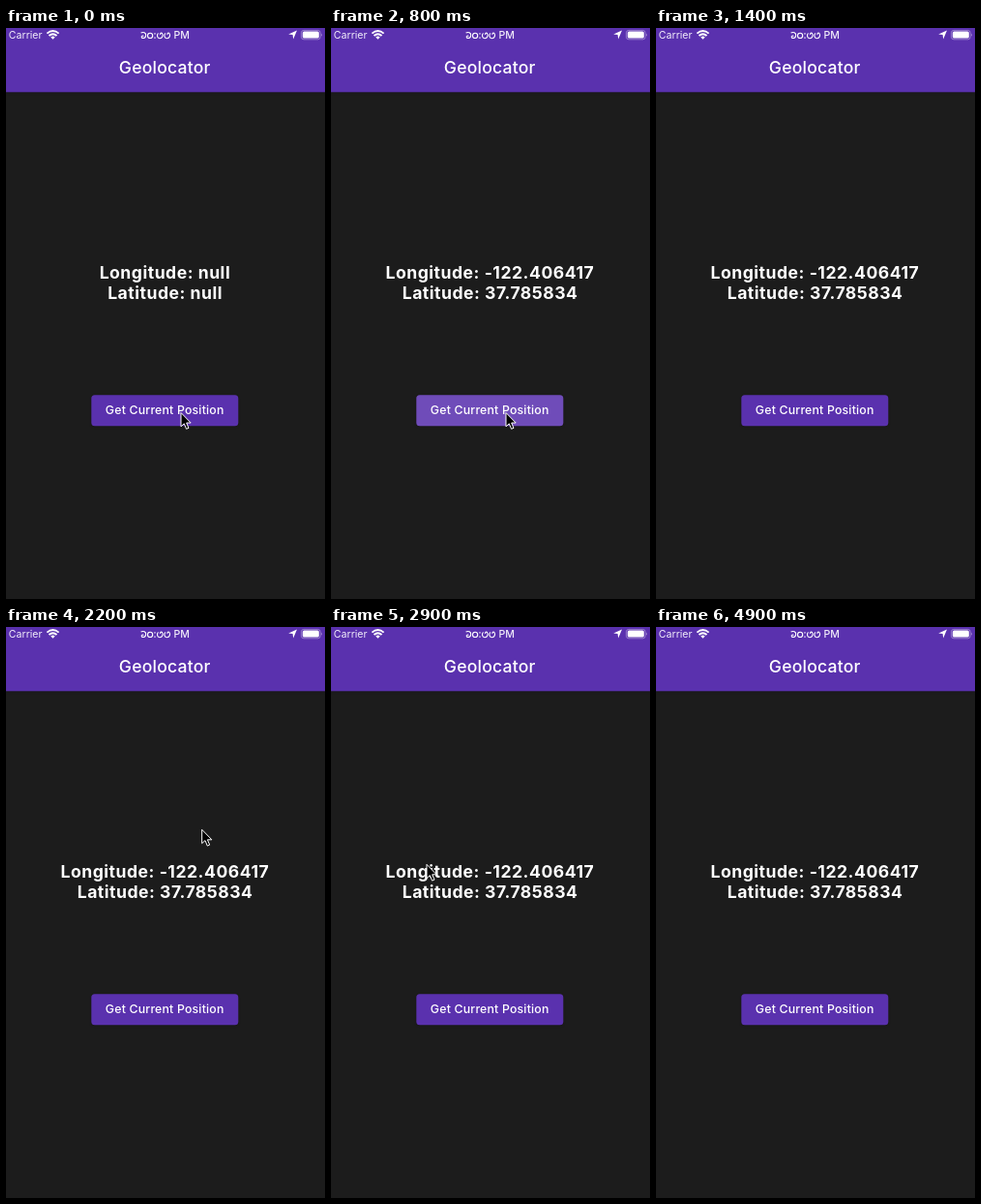
These frames come from a looping animation (330x590 px, 5800 ms). An HTML page:

```html
<!DOCTYPE html>
<html lang="en">
<head>
<meta charset="utf-8">
<title>Geolocator</title>
<style>
  html, body { margin: 0; width: 100%; height: 100%; overflow: hidden; background: #1c1c1c; }
  svg { display: block; width: 330px; height: 590px; }
  text { font-family: Inter, Roboto, sans-serif; fill: #fff; }
  .mid { text-anchor: middle; }
  .status { font-size: 10.6px; fill: #f1ecfa; }
  .title { font-size: 17.6px; font-weight: 500; letter-spacing: .2px; }
  .coords { font-size: 17.6px; font-weight: 700; letter-spacing: .5px; }
  .label { font-size: 12.3px; font-weight: 500; letter-spacing: .19px; }
  .line { fill: none; stroke: #fff; }
  .shadow { filter: drop-shadow(0 1px 1px rgba(0, 0, 0, .2)); }
</style>
</head>
<body>
<svg viewBox="0 0 330 590">
  <defs>
    <rect id="button" x="88.3" y="379.2" width="152" height="32" rx="3.5"/>
    <clipPath id="buttonClip"><use href="#button"/></clipPath>
    <path id="three" d="M1.5 1.6C-.2 3.2 .2 6.9 3 6.9C6 6.9 6.9 3.3 5.5 1.7C4.6 .8 3.2 1.6 3.6 3"/>
  </defs>
  <rect width="330" height="590" fill="#1c1c1c"/>
  <rect class="shadow" width="330" height="66.3" fill="#5a31ae"/>

  <text class="status" x="2.8" y="10.9">Carrier</text>
  <path class="line" stroke-width="1.9" d="M42.4 5.6Q48.5 .2 54.6 5.6M44.5 8Q48.5 4.4 52.5 8"/>
  <path d="M46.3 9.4Q48.5 7.6 50.7 9.4L48.5 11.7Z" fill="#fff"/>

  <!-- Bengali digits, drawn so that no extra font is needed -->
  <g class="line" stroke-width="1.1" role="img" aria-label="10:33">
    <path d="M139.6 5C142 3.7 144.9 5 144.7 7.6C144.5 10.6 141.4 11.3 140.3 9.6C139.7 8.2 141.5 7.4 142.3 8.6"/>
    <circle cx="149.1" cy="7.9" r="2.6"/>
    <path d="M154 5.3v1.3M154 9.4v1.3" stroke-width="1.3"/>
    <use href="#three" x="156" y="3.8"/>
    <use href="#three" x="163.4" y="3.8"/>
  </g>
  <text class="status" x="173.4" y="10.9" font-weight="500">PM</text>

  <path d="M301 2.4L297.2 11.4L296.6 7.1L292.2 6.5Z" fill="#fff"/>
  <rect class="line" x="305.4" y="2.4" width="19.8" height="9.4" rx="2.6" stroke-opacity=".4" stroke-width=".9"/>
  <rect x="306.8" y="3.5" width="17" height="7.1" rx="1.6" fill="#fff"/>
  <path d="M326.2 5.4Q327.7 7.1 326.2 8.8Z" fill="#fff" opacity=".6"/>

  <text class="title mid" x="164.2" y="47.2">Geolocator</text>
  <text class="coords mid" id="lon" x="164.4" y="259.3"></text>
  <text class="coords mid" id="lat" x="164.6" y="280.4"></text>

  <use class="shadow" href="#button" fill="#5a31ae"/>
  <g clip-path="url(#buttonClip)"><circle id="ripple" cy="396" fill="#fff"/></g>
  <text class="label mid" x="164.2" y="399.3">Get Current Position</text>

  <path id="cursor" d="M0 0V14.3L3.3 11.3L5.6 16.8L8 15.8L5.7 10.5H10.2Z"
        fill="#000" stroke="#fff" stroke-width="1" stroke-linejoin="round"/>
</svg>
<script>
  const LOOP = 5800, STEP = 100, CLICK = 600, FADE = 500;
  const $ = id => document.getElementById(id);
  const lon = $('lon'), lat = $('lat'), ripple = $('ripple'), cursor = $('cursor');

  const clamp = p => Math.min(1, Math.max(0, p));
  const mix = (a, b, p) => a + (b - a) * p;

  // Point on a Bezier curve, by repeated mixing
  function bezier(points, p) {
    while (points.length > 1)
      points = points.slice(1).map(([x, y], i) => [mix(points[i][0], x, p), mix(points[i][1], y, p)]);
    return points[0];
  }

  // Pointer: leaves at the lower right, comes back, circles and goes
  const strokes = [
    { start: 1100, end: 1300, path: [[181, 397.5], [190, 404], [240, 440], [308, 496]] },
    { start: 1800, end: 2200, path: [[300, 376], [0, 360], [0, 200], [202.7, 209.3]] },
    { start: 2200, end: 2900, path: [[202.7, 209.3], [330, 230], [150, 400], [99, 245.3]] },
    { start: 2900, end: 3100, path: [[99, 245.3], [115, 262], [140, 255], [156, 233]] }
  ];
  const isAway = t => (t > 1300 && t < 1800) || t > 3100;

  function drawPointer(t) {
    cursor.style.display = isAway(t) ? 'none' : '';
    if (isAway(t)) return;
    const { start, end, path } = strokes.find(s => t <= s.end);
    const [x, y] = bezier(path, clamp((t - start) / (end - start)));
    cursor.setAttribute('transform', `translate(${x} ${y})`);
  }

  function drawRipple(t) {
    const p = clamp((t - CLICK) / FADE);
    ripple.setAttribute('cx', mix(176, 164, p));
    ripple.setAttribute('r', mix(42, 152, p));
    ripple.setAttribute('opacity', t < CLICK ? 0 : .24 * (1 - p) ** 1.2);
  }

  function draw(t) {
    const found = t >= CLICK;
    lon.textContent = 'Longitude: ' + (found ? '-122.406417' : 'null');
    lat.textContent = 'Latitude: ' + (found ? '37.785834' : 'null');
    drawRipple(t);
    drawPointer(t);
  }

  const start = performance.now();
  function tick() {
    const t = (performance.now() - start) % LOOP;
    draw(Math.floor(t / STEP) * STEP);
    requestAnimationFrame(tick);
  }
  tick();
</script>
</body>
</html>
```
